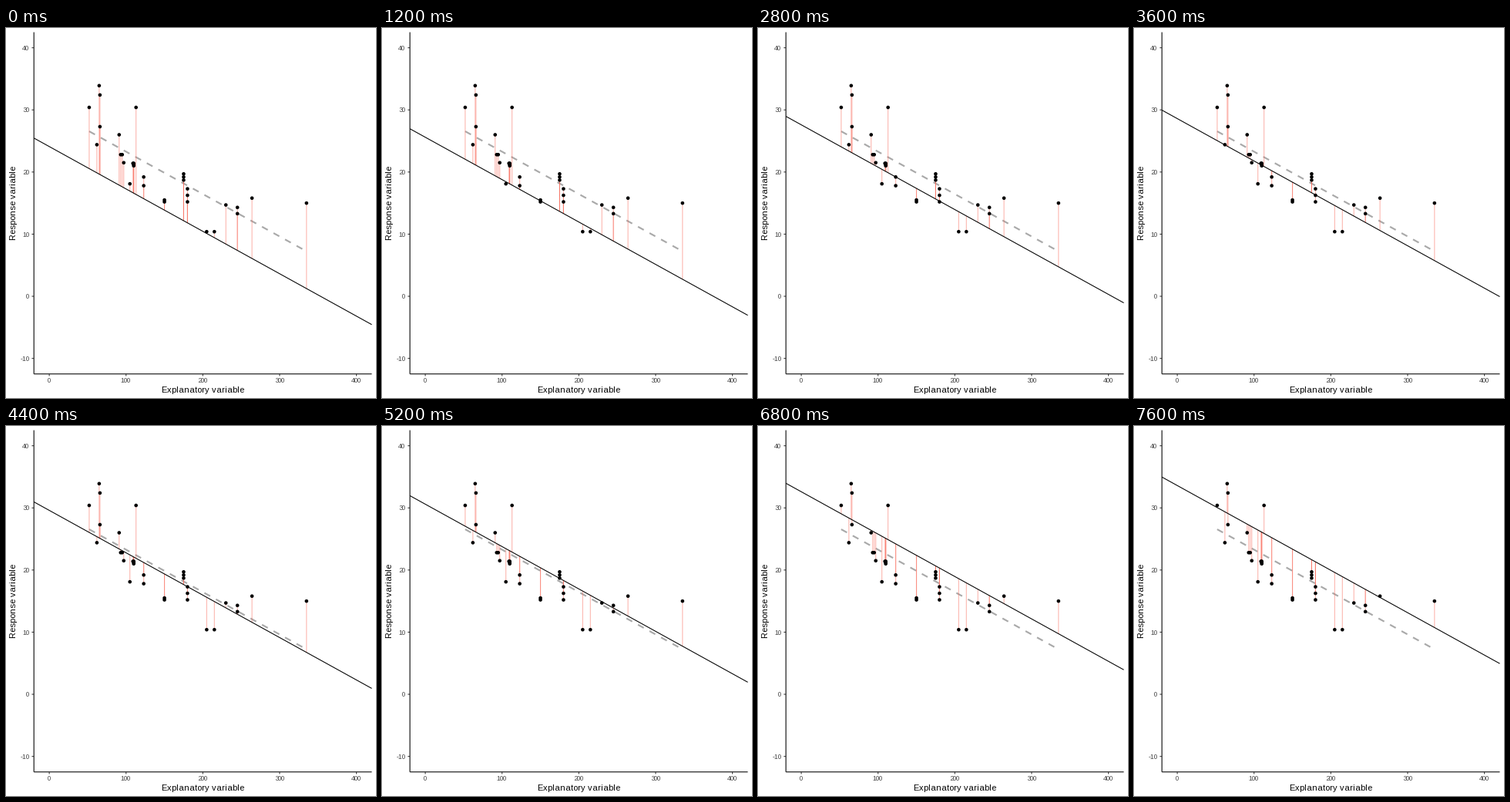
A matplotlib script that plays this animation: 480x480 px, repeating every 8 s.

```python
import numpy as np
import matplotlib.pyplot as plt
from matplotlib.animation import FuncAnimation
from matplotlib.patches import Circle

SIZE, DPI = 480, 72
LEFT, RIGHT, TOP, BOTTOM = 36.2, 474.52, 5.48, 448.8
X_MIN, X_MAX, Y_MIN, Y_MAX = -20, 420, -12.5, 42.5
SLOPE, BEST_INTERCEPT = -0.06823, 30.099
START_INTERCEPT, STEP = 24.1, 0.5
FRAMES, INTERVAL = 20, 400
THIN = 1.067

# Points share columns (evenly spaced: low, high, count), rows, or stand alone.
COLUMNS = {66: (27.3, 32.4, 2), 110: (21, 21.4, 3), 123: (17.8, 19.2, 2),
           150: (15.2, 15.5, 2), 175: (18.7, 19.7, 3), 180: (15.2, 17.3, 3),
           245: (13.3, 14.3, 2)}
ROWS = {30.4: (52, 113), 22.8: (93, 95), 10.4: (205, 215)}
LONERS = [(62, 24.4), (65, 33.9), (91, 26), (97, 21.5), (105, 18.1),
          (109, 21.4), (230, 14.7), (264, 15.8), (335, 15)]
points = LONERS + [(x, y) for y, row in ROWS.items() for x in row]
points += [(x, y) for x, span in COLUMNS.items() for y in np.linspace(*span)]

# Whole-pixel glyph advances
plt.rcParams["text.hinting_factor"] = 1
plt.rcParams["font.family"] = "Liberation Sans"


def px(x):
    return LEFT + (x - X_MIN) / (X_MAX - X_MIN) * (RIGHT - LEFT)


def py(y):
    return BOTTOM - (y - Y_MIN) / (Y_MAX - Y_MIN) * (BOTTOM - TOP)


fig = plt.figure(figsize=(SIZE / DPI, SIZE / DPI), dpi=DPI, facecolor="white")
ax = fig.add_axes([0, 0, 1, 1])
ax.set_xlim(0, SIZE)
ax.set_ylim(SIZE, 0)
ax.axis("off")


def stroke(x, y, color="black", width=THIN, **style):
    line, = ax.plot(x, y, color=color, lw=width, snap=False,
                    solid_capstyle="butt", **style)
    return line


def draw_axes():
    stroke([LEFT, LEFT], [TOP, BOTTOM])
    stroke([LEFT, RIGHT], [BOTTOM, BOTTOM])
    label = dict(color="#4D4D4D", fontsize=8.8, va="baseline")
    for value in range(0, 401, 100):
        stroke([px(value)] * 2, [BOTTOM, BOTTOM + 2.74], "#333333")
        ax.text(px(value) - 0.4, 460, str(value), ha="center", **label)
    for value in range(-10, 41, 10):
        stroke([LEFT - 2.74, LEFT], [py(value)] * 2, "#333333")
        ax.text(30.4, py(value) + 3.2, str(value), ha="right", **label)
    title = dict(fontsize=11, ha="center", va="baseline")
    ax.text((LEFT + RIGHT) / 2, 473, "Explanatory variable", **title)
    ax.text(13, (TOP + BOTTOM) / 2, "Response variable", rotation=90,
            rotation_mode="anchor", **title)


draw_axes()
fit_x = np.array([52, 335])
stroke(px(fit_x), py(BEST_INTERCEPT + SLOPE * fit_x), "#A9A9A9", 2 * THIN,
       linestyle=(0, (4, 4)), zorder=2)
residuals = [stroke([px(x)] * 2, [py(y)] * 2, "#FA6A5A", alpha=0.5, zorder=3)
             for x, y in points]
edge_x = np.array([X_MIN, X_MAX])
model = stroke(px(edge_x), py(edge_x), zorder=4)
for x, y in points:
    ax.add_patch(Circle((px(x), py(y)), 2.3, color="black", lw=0,
                        snap=False, zorder=5))


def update(frame):
    intercept = START_INTERCEPT + STEP * frame
    model.set_ydata(py(intercept + SLOPE * edge_x))
    for line, (x, y) in zip(residuals, points):
        line.set_ydata([py(y), py(intercept + SLOPE * x)])
    return [model, *residuals]


anim = FuncAnimation(fig, update, frames=FRAMES, interval=INTERVAL,
                     repeat=True, repeat_delay=0)
plt.show()
```
